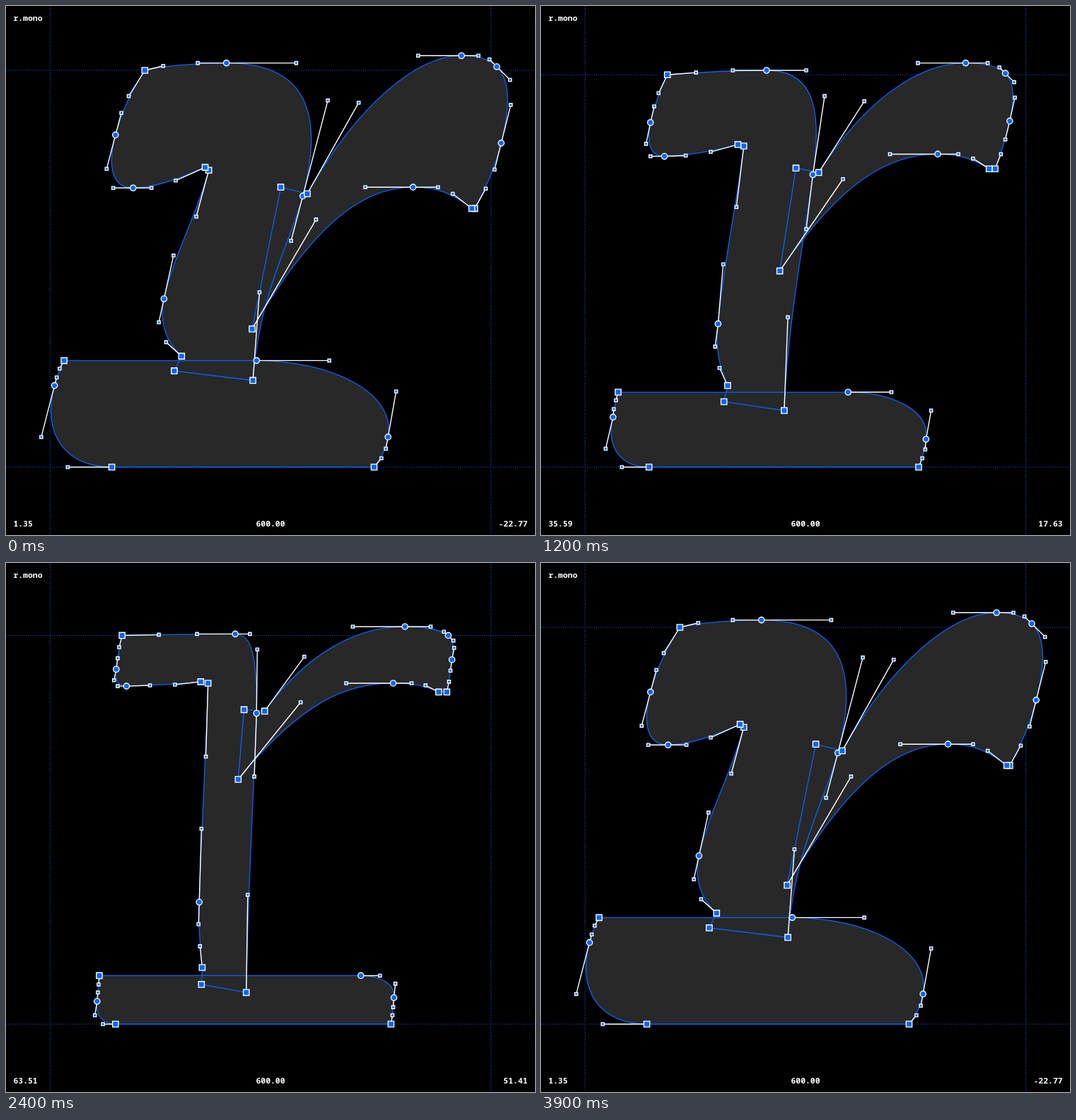
These frames come from a looping animation (748x748 px, 4 s). An HTML page with a canvas:

```html
<!DOCTYPE html>
<html lang="en">
<head>
<meta charset="utf-8">
<title>Variable glyph outline</title>
<style>
  html, body { margin: 0; width: 100%; height: 100%; overflow: hidden; background: #000; }
  #stage { position: relative; width: 748px; height: 748px; overflow: hidden; }
  canvas { position: absolute; inset: 0; width: 748px; height: 748px; }
  span {
    position: absolute; color: #fff; white-space: pre;
    font: 700 11.43px/14px "Noto Sans Mono", "DejaVu Sans Mono", monospace;
  }
  #name { left: 10.4px; top: 10px; }
  #lsb { left: 10.4px; top: 725px; }
  #adv { left: 0; width: 748px; top: 725px; text-align: center; }
  #rsb { right: 10.4px; top: 725px; }
</style>
</head>
<body>
<div id="stage">
  <canvas id="view"></canvas>
  <span id="name">r.mono</span>
  <span id="lsb"></span>
  <span id="adv"></span>
  <span id="rsb"></span>
</div>
<script>
const SIZE = 748, K = SIZE / 720, LEFT = 60 * K, BASE = 652, ADVANCE = 600;
const LOOP = 4000, STEP = 100;
const BLUE = '#0066ff', WHITE = '#fff', FILL = '#282828';

const px = x => LEFT + x * K;
const py = y => BASE - y * K;
const lerp = (a, b, t) => a + (b - a) * t;
const byId = id => document.getElementById(id);

// Pen spec: s corner, c smooth, h handle; a capital keeps the previous y.
// v: handle in line with the two points before it, only y given.
// -: handle a third of the way along a straight run.
function trace(spec, values) {
  const next = values[Symbol.iterator]();
  const read = () => next.next().value;
  const pts = [];
  [...spec].forEach((code, i) => {
    const a = pts[i - 2], b = pts[i - 1];
    if (code === '-') pts.push(null);
    else if (code === 'v') {
      const y = read();
      pts.push({ x: Math.round(b.x + (y - b.y) * (b.x - a.x) / (b.y - a.y)), y });
    } else {
      const x = read();
      pts.push({ x, y: code < 'a' ? b.y : read() });
    }
  });
  for (let i = 0; i < pts.length; i++) {
    if (pts[i]) continue;
    const a = pts[i - 1], b = pts[(i + 2) % pts.length];
    const third = n => ({
      x: Math.round(lerp(a.x, b.x, n / 3)),
      y: Math.round(lerp(a.y, b.y, n / 3))
    });
    pts[i] = third(1);
    pts[++i] = third(2);
  }
  return pts;
}

const part = (boldSpec, boldValues, thinSpec, thinValues) => ({
  kinds: boldSpec.toLowerCase().replace(/v/g, 'h'),
  bold: trace(boldSpec, boldValues),
  thin: trace(thinSpec, thinValues)
});

const stem = part(
  'shhCHhcvhssshhcvhsshhCHhcvh',
  [129,540, 154,546, 201,550, 240, 335, 378,499, 344,369, 308, 285,238,
   276,118, 169,131, 179,151, 158,170, 148,197, 155,229, 288, 199,341, 216,404,
   211,408, 171,390, 138,380, 113, 86, 77,406, 89,452, 482, 107,505],
  's--cHhchhsss--c--ss--cHhc--',
  [93,527, 254,528, 262, 266,512, 271,432, 270,342, 266,166, 266,31, 212,41,
   212,65, 211,156, 215,474, 204,475, 102,473, 93, 89,478, 90,488]);

const foot = part(
  'sCHhcvhsSHhcvh',
  [19,145, 281, 380, 471,103, 460,41, 25, 451,12, 441,0, 84, 24, -12,41, 6,111, 122, 13,134],
  'sCHhc--sSHhc--',
  [75,53, 446, 460, 470,47, 469,35, 468,0, 90, 80, 73,7, 74,18]);

const arm = part(
  'sshhCHhcvhcvhsShhCHhs',
  [314,381, 350,372, 420,496, 501,560, 560, 583, 598,555, 608,545, 527, 627,493,
   614,441, 405, 593,379, 578,352, 574, 548,372, 528,381, 494, 429, 362,337, 275,188],
  'sshhCHhcvhc--sShhCHhs',
  [256,436, 282,435, 334,501, 398,538, 470, 507, 526,531, 531,526, 521, 537,515,
   536,505, 534,468, 522, 505,475, 486,478, 463, 399, 338,454, 253,357]);

const parts = [stem, foot, arm];

// 0 = bold, 1 = thin: a cosine swing through a weight axis with one bend
function thinness(ms) {
  const p = (1 - Math.cos(2 * Math.PI * ms / LOOP)) / 2;
  return Math.max(0.637 * p, 1.574 * p - 0.5643);
}

function pose({ kinds, bold, thin }, q) {
  return bold.map((pt, i) => ({
    kind: kinds[i],
    x: Math.round(lerp(pt.x, thin[i].x, q)),
    y: Math.round(lerp(pt.y, thin[i].y, q))
  }));
}

// Each segment is [from, to] or [from, handle, handle, to]
function segments(pts) {
  const at = i => pts[i % pts.length], out = [];
  pts.forEach((pt, i) => {
    if (pt.kind === 'h') return;
    out.push(at(i + 1).kind === 'h' ? [pt, at(i + 1), at(i + 2), at(i + 3)] : [pt, at(i + 1)]);
  });
  return out;
}

// Horizontal extremes of a segment
function extremes(seg) {
  const xs = seg.map(pt => pt.x);
  if (xs.length === 2) return xs;
  const [a, b, c, d] = xs;
  const q2 = d - 3 * c + 3 * b - a, q1 = 2 * (a - 2 * b + c), q0 = b - a;
  const root = Math.sqrt(Math.max(0, q1 * q1 - 4 * q2 * q0));
  const ts = q2 ? [(-q1 + root) / (2 * q2), (-q1 - root) / (2 * q2)] : q1 ? [-q0 / q1] : [];
  return [a, d, ...ts.filter(t => t > 0 && t < 1).map(t =>
    a + 3 * q0 * t + 1.5 * q1 * t * t + q2 * t * t * t)];
}

const ratio = window.devicePixelRatio || 1;
const view = byId('view');
view.width = view.height = SIZE * ratio;
const ctx = view.getContext('2d');
ctx.scale(ratio, ratio);

function outline(segs) {
  const path = new Path2D();
  path.moveTo(px(segs[0][0].x), py(segs[0][0].y));
  for (const seg of segs) {
    const to = seg.slice(1).flatMap(pt => [px(pt.x), py(pt.y)]);
    if (to.length === 2) path.lineTo(...to);
    else path.bezierCurveTo(...to);
  }
  path.closePath();
  return path;
}

function stroke(color, width, path) {
  ctx.strokeStyle = color;
  ctx.lineWidth = width;
  ctx.stroke(path);
}

function guides(xHeight) {
  const path = new Path2D();
  for (const x of [px(0), px(ADVANCE)]) { path.moveTo(x, 0); path.lineTo(x, SIZE); }
  for (const y of [py(0), py(xHeight)]) { path.moveTo(0, y); path.lineTo(SIZE, y); }
  ctx.setLineDash([K, 2 * K]);
  stroke(BLUE, K, path);
  ctx.setLineDash([]);
}

function levers(segs) {
  const path = new Path2D();
  for (const [a, b, c, d] of segs) {
    if (!d) continue;
    for (const [from, to] of [[a, b], [d, c]]) {
      path.moveTo(px(from.x), py(from.y));
      path.lineTo(px(to.x), py(to.y));
    }
  }
  stroke(WHITE, 1.4, path);
}

function node({ kind, x, y }) {
  const path = new Path2D(), r = kind === 'h' ? 2.1 : 4.15;
  if (kind === 'c') path.arc(px(x), py(y), r, 0, 2 * Math.PI);
  else path.rect(px(x) - r, py(y) - r, 2 * r, 2 * r);
  ctx.fillStyle = BLUE;
  ctx.fill(path);
  stroke(WHITE, 1.35, path);
}

function draw(ms) {
  const q = thinness(ms);
  const points = parts.map(p => pose(p, q));
  const segs = points.map(segments);
  const paths = segs.map(outline);

  ctx.fillStyle = '#000';
  ctx.fillRect(0, 0, SIZE, SIZE);
  guides(points[0][0].y);
  ctx.fillStyle = FILL;
  paths.forEach(path => ctx.fill(path));
  paths.forEach(path => stroke(BLUE, 1.3, path));
  segs.forEach(levers);
  points.flat().forEach(node);

  const xs = segs.flat().flatMap(extremes);
  byId('lsb').textContent = Math.min(...xs).toFixed(2);
  byId('adv').textContent = ADVANCE.toFixed(2);
  byId('rsb').textContent = (ADVANCE - Math.max(...xs)).toFixed(2);
}

let shown = -1;
function tick() {
  const ms = Math.floor(performance.now() % LOOP / STEP) * STEP;
  if (ms !== shown) draw(shown = ms);
  requestAnimationFrame(tick);
}
tick();
</script>
</body>
</html>
```
